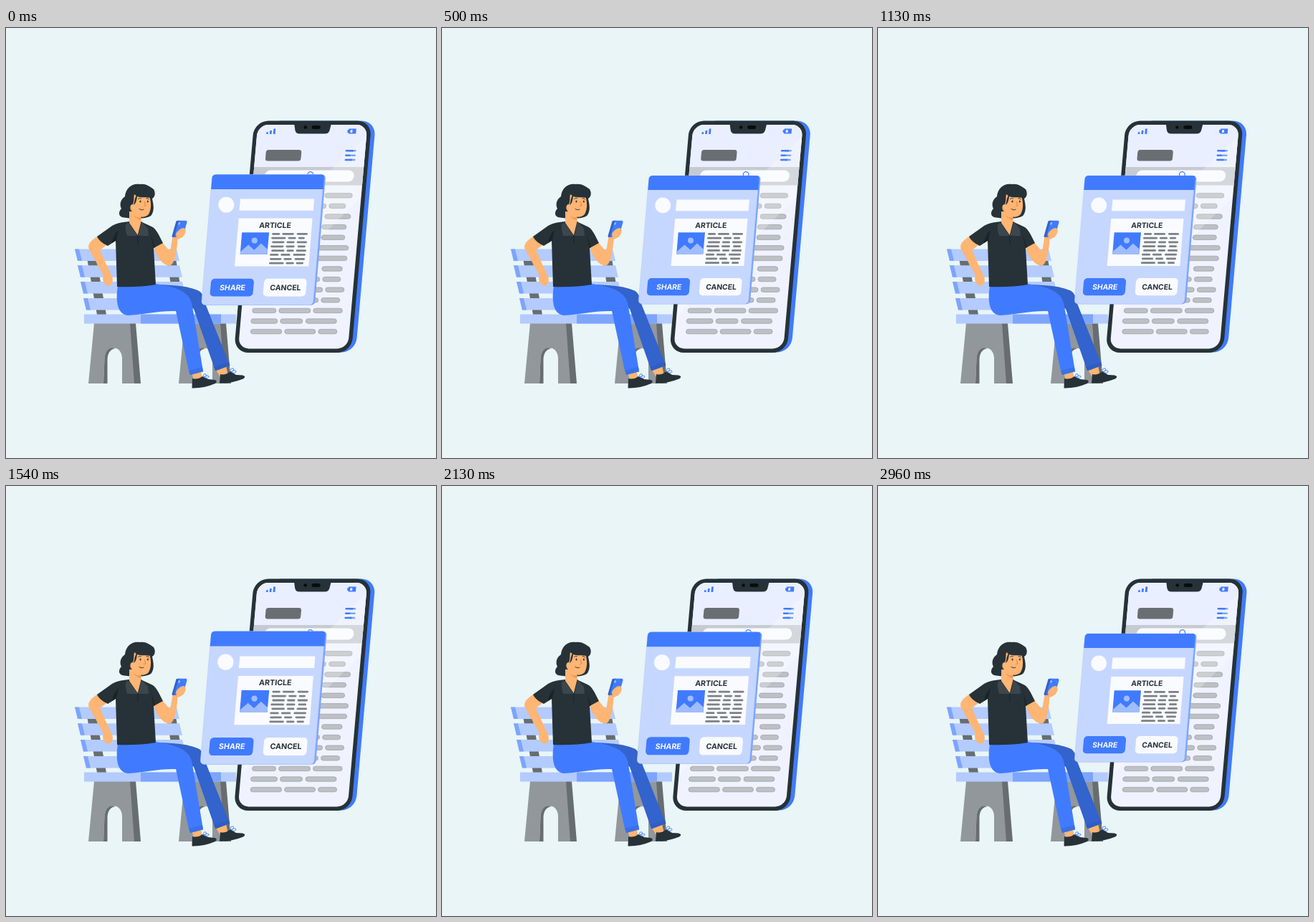
These frames come from a looping animation (600x600 px, 3000 ms). An HTML page:

```html
<!DOCTYPE html>
<html lang="en">
<head>
<meta charset="utf-8">
<title>Share article</title>
<style>
html, body { margin: 0; width: 100%; height: 100%; overflow: hidden; background: #e9f5f6; }
svg { display: block; width: 100vw; height: 100vh; }
text { font: 700 10.3px Inter, "Open Sans", sans-serif; text-anchor: middle; }
.blue { fill: #407bff; }
.mid { fill: #7da4ff; }
.pale { fill: #b3cbff; }
.dark { fill: #263238; }
.skin { fill: #ffb573; }
.white { fill: #fafbff; }
</style>
</head>
<body>
<svg viewBox="0 0 600 600">
  <defs>
    <clipPath id="screenClip"><rect x="338" y="135" width="153" height="312.5" rx="15"/></clipPath>
    <g id="benchLeg">
      <path fill="#676d70" d="M173 412H181L188 496H163V462C162 440 136 440 136 464V496H125L132 412Z"/>
      <path fill="#92979b" d="M123 412H173L179 496H162V460C161 441 139 442 137.500 461L136 496H115Z"/>
      <path fill="#676d70" d="M136 496L137.500 461C139 447 147 445 153 447C146 448 142 453 141.500 462V496Z"/>
    </g>
  </defs>

  <g id="phone">
    <g transform="matrix(1 0 -.0877 1 25.4 0)">
      <rect class="blue" x="350" y="129.500" width="152.300" height="323" rx="20"/>
      <rect class="dark" x="332.500" y="129.500" width="164" height="323.500" rx="20"/>
      <g clip-path="url(#screenClip)">
        <rect x="330" y="130" width="170" height="320" fill="#f0f3ff"/>
        <rect x="330" y="130" width="170" height="64" fill="#eaefff"/>
        <rect x="330" y="194" width="170" height="25.500" fill="#c6cad1"/>
      </g>
      <rect class="white" x="353.500" y="198.500" width="125" height="16" rx="8"/>
    </g>
    <circle cx="425" cy="204.500" r="3.800" fill="none" stroke="#407bff" stroke-width="1.300"/>
    <g id="rows" fill="#bdc0c4" stroke="#989ca0" stroke-width=".7"></g>
    <g transform="matrix(1 0 -.0877 1 25.4 0)" clip-path="url(#screenClip)">
      <path fill="#fff" opacity=".24" d="M494 148L330 318V411L500 226Z"/>
    </g>
    <path class="dark" d="M402.500 134H454L452 142Q451 147.500 445 147.500H410Q404 147.500 403.500 142Z"/>
    <circle cx="418" cy="138.500" r="2.300" fill="#080c0e"/>
    <rect x="427" y="136" width="12" height="5" rx="2.500" fill="#080c0e"/>
    <path class="blue" d="M363.300 148l.3-2.800h2.600l-.3 2.800zM368 148l.5-5h2.700l-.5 5zM373 148l.6-7.500h2.800l-.6 7.500z"/>
    <path class="blue" d="M478.600 140.500H489L488.400 147.500H478L478.100 146H476.500L476.900 142H478.500Z"/>
    <path fill="#eaefff" d="M480.800 142.200h3l-.3 3.700h-3z"/>
    <rect x="362.500" y="170" width="49.500" height="15.500" rx="3.500" fill="#686e72" transform="translate(15.600) skewX(-5)"/>
    <g stroke-width="2.500" stroke-linecap="round">
      <path stroke="#7da4ff" d="M480 171.300h7.500M480 177.700h7M480 184h6.500"/>
      <path stroke="#407bff" d="M475 171.300h9M474.500 177.700h5M474 184h8"/>
    </g>
  </g>

  <g id="bench">
    <path fill="#676d70" d="M111 310h13l16 90h-13zM222 310h13l12 72h-13z"/>
    <g id="slats"></g>
    <use href="#benchLeg"/>
    <use href="#benchLeg" x="126"/>
    <path class="pale" d="M109 399.500H321V412.500H109Z"/>
    <path class="mid" d="M188 399.500H300V412.500H188Z"/>
  </g>

  <g id="reader">
    <path class="skin" d="M292 476L307 471L309.500 483L299 487ZM260 483L272 480L274 489L262 493Z"/>
    <path fill="#3363cc" d="M205 358C240 358 262 362 271 368C276 373 277 380 279 387L312 470L292 478L262 392L230 372Z"/>
    <path fill="#2f5dc2" d="M290 473L311 466L312.500 471L292.500 478.500Z"/>
    <path class="blue" d="M156 360L209 357C242 362 257 369 260 388L274 473L275 479L257 484L255 478L237 395C215 394 190 400 170 401C157 400 152 385 156 360Z"/>
    <path fill="#3a70e8" d="M255.500 478L274 473L275 479.500L257 484Z"/>
    <path class="dark" d="M260 489L259.500 502.500Q276 503 292 496Q296 492 291 491L282 490L274 486Q268 491 260 489ZM299 483L298 495.800Q315 496 331 489.500Q336 486 330 484.500L321 484L313 479Q306 485 299 483Z"/>
    <path fill="none" stroke="#407bff" stroke-width=".9" d="M275 487q0-5 4-4q2 3-3 4q5-3 7-1q0 3-5 2M313 480q0-6 4-5q2 3-3 5q5-4 7-1q0 3-5 2"/>

    <path class="skin" d="M129 290C118 296 113 303 116 309L136 345C133 353 138 360 145 359.500C150 357 150 348 146 343L131 310L144 300Z"/>
    <path class="skin" d="M206 306C211 322 220 332 229 331.500C236 329 239 306 239.500 295C247 293 252 287 250 281L243 278L233 288L229 312L218 299Z"/>
    <path fill="#3363cc" d="M237.500 269.500Q238 268.800 240 268.800H243L236 292H233Q231 292 231.600 290Z"/>
    <path class="blue" d="M241 268.800H251Q253 269 252.500 271L247.500 289Q247 291.500 244.500 292H234.500Z"/>
    <path fill="#b3cbff" d="M241 271.500h2l-.8 3h-2z"/>
    <path class="skin" d="M237 287C239 283 243 280 247 279C251 279 252 283 249 287C247 292 243 294 238 294Z"/>

    <path class="dark" d="M172 270C160 271 153 273 148 276L127 291C130 297 136 301 142 304L153 297L155 361Q185 362 209 358L206 307L219 300C214 290 209 279 203 277L190 271Z"/>
    <path fill="#192328" d="M157 282C152 287 149 292 148 300L154 296ZM202 288L206 307L208 306Z"/>
    <path class="dark" d="M187 218C176 216 167 223 166 235C158 241 159 249 161 252C156 257 157 264 165 264.500C180 267 199 266 203 261C208 253 205 244 204 238C208 236 209 230 206 225C200 221 195 217 187 218Z"/>
    <path class="skin" d="M172 256H188L189 272L184 290L172 274Z"/>
    <path fill="#e89b59" d="M178 261Q183 266 188 264L188 268Q182 267 178 261Z"/>
    <path class="skin" d="M179 232C184 237 193 237 200 234C203 243 203 253 199 260C192 267 182 263 178 257C172 255 172 246 177 246C179 241 178 237 179 232Z"/>
    <path class="dark" d="M178 247C180 241 179 236 185 229L202 230Q205 233 202 237C196 236 188 237 183 235C182 242 181 245 178 247Z"/>
    <ellipse class="dark" cx="187.500" cy="242" rx="1" ry="1.500"/>
    <ellipse class="dark" cx="197.800" cy="242" rx="1" ry="1.500"/>
    <path fill="none" stroke="#263238" stroke-width=".9" stroke-linecap="round" d="M184.500 238.500q2-1.800 4-.8M196 237.800q2-.6 3.500 1M186 252.500q3 2.600 6 .8"/>
    <path fill="none" stroke="#e07c3e" stroke-width=".9" d="M193 242l2 6-2.500.6"/>
    <path fill="#3c474d" d="M171 271L184 290H169Q166 281 167 274ZM189 270L198 280L199 290L184 290Z"/>
    <path fill="none" stroke="#162025" stroke-width=".7" d="M171 271L184 290L189 270M184 290V302"/>
  </g>

  <g id="card">
    <g transform="matrix(1 0 -.084 1 24.8 0)">
      <rect class="mid" x="283.500" y="206" width="153.800" height="179.300" rx="5"/>
      <rect x="281.500" y="206" width="153.300" height="179" rx="5" fill="#c6d7ff" stroke="#a9c3ff" stroke-width=".5"/>
      <path class="blue" d="M281.500 226V211Q281.500 206 286.500 206H431.500Q435.500 206 435.500 211V226Z"/>
      <rect class="blue" x="292" y="349" width="59" height="24.300" rx="5"/>
      <rect class="white" x="365" y="349" width="58.500" height="24.300" rx="5"/>
    </g>
    <circle class="white" cx="308.200" cy="247.400" r="10.800"/>
    <path class="white" d="M327.500 239.500H429L427.700 255.300H326ZM325.300 266H426.500L421.300 332H319.600Z"/>
    <path class="blue" d="M329.700 285.300H367L364.300 315.400H327.200Z"/>
    <path fill="#a0bdff" d="M327.500 312L338.500 302.500L346.500 309.500L356 300.500L364.800 308.500L364.300 315.400H327.200Z"/>
    <circle cx="347" cy="296.500" r="4" fill="#a0bdff"/>
    <g id="lines" fill="#7b8084"></g>
    <text class="dark" transform="translate(375 279) skewX(-5)">ARTICLE</text>
    <text class="white" transform="translate(316.300 365) skewX(-8)">SHARE</text>
    <text class="dark" transform="translate(389.200 365) skewX(-5)">CANCEL</text>
  </g>
</svg>
<script>
const byId = id => document.getElementById(id);

// Each row holds start,end pairs of rounded bars.
function bars(id, top, step, height, rows) {
  let out = "";
  rows.forEach((row, i) => {
    for (let j = 0; j < row.length; j += 2)
      out += `<rect x="${row[j]}" y="${top + i * step - height / 2}" width="${row[j + 1] - row[j]}" height="${height}" rx="${height / 2}"/>`;
  });
  byId(id).innerHTML = out;
}

bars("rows", 233.8, 14.6, 6.4, [
  [445, 483.5], [410, 447, 451, 474], [445, 481], [441, 475], [440, 473],
  [434, 478], [433, 476], [441, 469.500], [410, 438, 442, 467],
  [410, 442, 446, 472], [400, 436, 440, 466],
  [344, 377, 381, 425, 429, 469.500], [342, 379, 383, 414, 418.500, 461.500],
  [341.500, 385, 389, 432, 436, 462]
]);
bars("lines", 287.4, 5.75, 2.7, [
  [371, 382, 385, 401, 405, 420], [370, 390, 393, 404, 407, 416],
  [371, 388, 391, 402, 405, 419], [369, 387, 390, 402, 406, 417],
  [370, 388, 391, 401, 404, 418], [368, 380, 383, 396, 400, 417],
  [368, 384, 387, 398, 402, 416], [367, 387, 390, 401, 404, 414]
]);

byId("slats").innerHTML = [0, 1, 2, 3].map(i => {
  const x = 96 + 4 * i, y = 308.500 + 22.8 * i;
  return `<path class="pale" d="M${x} ${y}h142l4 16.500h-142z"/><path class="mid" d="M${x} ${y}h6l4 16.500h-6z"/>`;
}).join("");

const LOOP = 3000, BEAT = 1500, STEP = 1000 / 24;
const shake = [0, -1, 2, -4, 4, -4, 4, -4, 2, -1, 0];
const pulse = [0, 1, 0.5, 0, 0, 1, 0, 0, 0, 0, 0];

// Linear interpolation over equally spaced keys.
function along(keys, p) {
  const pos = p * (keys.length - 1), i = Math.floor(pos);
  return keys[i] + (keys[i + 1] - keys[i]) * (pos - i);
}

function draw(now) {
  const tick = Math.floor((now % LOOP + 2) / STEP) % 72;
  const p = Math.max(24, tick * STEP + 11) % BEAT / BEAT;
  const scale = 1 + 0.1 * along(pulse, p);
  byId("phone").setAttribute("transform", `translate(${1.2 * along(shake, p)} 0)`);
  byId("card").setAttribute("transform", `translate(359.300 295.500) scale(${scale}) translate(-359.300 -295.500)`);
}

const start = performance.now();
function loop() {
  draw(performance.now() - start);
  requestAnimationFrame(loop);
}
loop();
</script>
</body>
</html>
```
